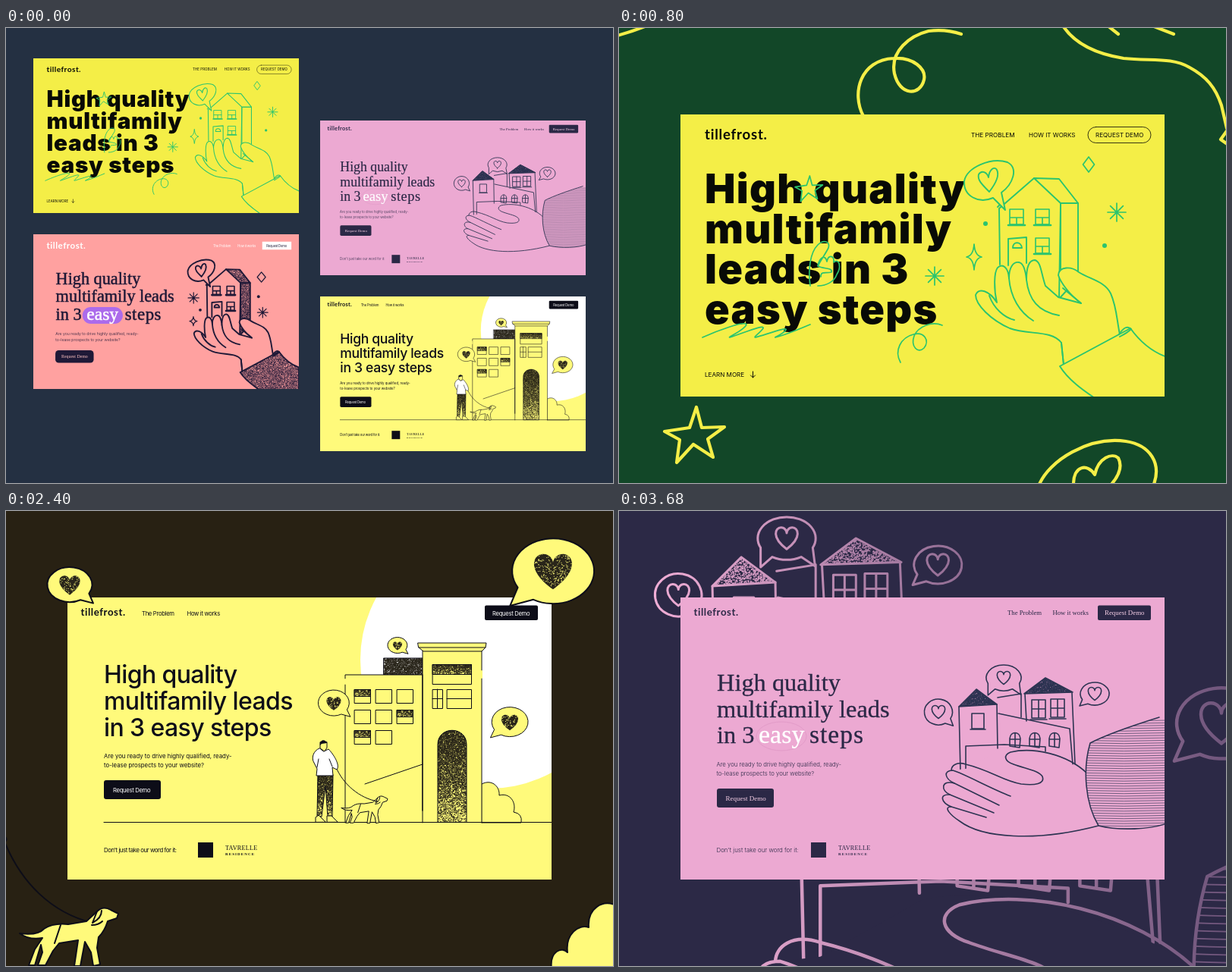
An HTML page with a canvas that plays this animation: 800x600 px, repeating every 4000 ms.

```html
<!DOCTYPE html>
<html lang="en">
<head>
<meta charset="utf-8">
<title>Landing page concepts</title>
<style>
html, body { margin: 0; width: 800px; height: 600px; overflow: hidden; background: #243042; }
canvas { display: block; }
</style>
</head>
<body>
<canvas id="stage" width="800" height="600"></canvas>
<script>
const ctx = document.getElementById('stage').getContext('2d');
const SANS = 'Inter, sans-serif', SERIF = '"Liberation Serif", serif', LOGO = 'Lato, sans-serif';
const BRAND = 'tillefrost.';
const PITCH = ['Are you ready to drive highly qualified, ready-', 'to-lease prospects to your website?'];

// ---- helpers ----
const path = d => d instanceof Path2D ? d : new Path2D(d);

function place(d, x, y, sx, sy = sx) {
  const p = new Path2D();
  p.addPath(path(d), new DOMMatrix([sx, 0, 0, sy, x, y]));
  return p;
}
function fill(d, color) { ctx.fillStyle = color; ctx.fill(path(d)); }
function line(d, color, width = 1) {
  ctx.strokeStyle = color;
  ctx.lineWidth = width;
  ctx.stroke(path(d));
}
function shape(d, color, ink, width) { fill(d, color); line(d, ink, width); }
function box(x, y, w, h, color, r = 0) {
  ctx.fillStyle = color;
  ctx.beginPath();
  ctx.roundRect(x, y, w, h, r);
  ctx.fill();
}
function dot(x, y, r, color) { box(x - r, y - r, 2 * r, 2 * r, color, r); }
function frame(x, y, w, h) { return `M${x} ${y}h${w}v${h}h${-w}Z`; }

function text(s, x, y, size, color, { font = SANS, weight = 400, gap = 0, thick = 0 } = {}) {
  ctx.font = `${weight} ${size}px ${font}`;
  ctx.letterSpacing = gap + 'px';
  ctx.fillStyle = color;
  ctx.fillText(s, x, y);
  if (thick) {
    ctx.strokeStyle = color;
    ctx.lineWidth = thick;
    ctx.strokeText(s, x, y);
  }
}
function lines(list, x, y, step, ...style) {
  list.forEach((s, i) => text(s, x, y + i * step, ...style));
}
function logo(x, y, size, color) {
  text(BRAND, x, y, size, color, { font: LOGO, weight: 700, gap: size * 0.042 });
}

// Seeded grain inside a shape; fade thins it towards the bottom.
function stipple(d, [x, y, w, h], color, density, fade = 0) {
  let seed = 7;
  const rnd = () => (seed = (seed * 16807) % 2147483647) / 2147483647;
  ctx.save();
  ctx.clip(path(d));
  ctx.fillStyle = color;
  for (let n = w * h * density; n > 0; n--) {
    const px = rnd() * w, py = rnd() * h;
    if (rnd() >= fade * py / h) ctx.fillRect(x + px, y + py, 1, 1);
  }
  ctx.restore();
}

// ---- small motifs (unit size) ----
const HEART = 'M0 .9C-1.4 -.1 -1 -.9 -.5 -.9C-.15 -.9 0 -.6 0 -.45C0 -.6 .15 -.9 .5 -.9C1 -.9 1.4 -.1 0 .9Z';
const SPEECH = 'M.86 .51A1 1 0 1 0 .48 .88L1.05 1.07Z';
const TWIN = 'M.9 .44A1 1 0 1 0 -.9 .44L-.9 1.35L-.5 .87A1 1 0 0 0 .5 .87L.98 1.3Z';
const SPARK = 'M0 -1Q.1 -.1 1 0Q.1 .1 0 1Q-.1 .1 -1 0Q-.1 -.1 0 -1Z';
const DIAMOND = 'M0 -1L1 0L0 1L-1 0Z';
const BURST = 'M-1 0H1M0 -1V1M-.7 -.7L.7 .7M-.7 .7L.7 -.7';
const STAR = 'M102 500L109 527L139 526L117 542L124 566L98 549L76 573L80 543L60 532L93 527Z';

// ---- doodles behind the first two pages ----
function doodles(color) {
  [
    'M-2 10Q16 5 34 -2',
    'M322 116C306 86 318 42 362 40C388 38 405 54 402 68C397 90 370 90 363 60C357 30 384 10 408 4Q430 1 451 8',
    'M585 -3C600 20 628 34 665 40C700 44 728 38 752 52C774 64 786 78 794 102L801 132',
    'M803 133L793 147L803 154', 'M644 -3L658 8', 'M700 -4L731 8', STAR,
    'M553 604C566 570 620 538 668 545C700 550 716 574 704 604',
    'M599 604C598 576 618 574 627 589C632 566 650 560 658 567C665 580 656 594 647 604'
  ].forEach(d => line(d, color, 4.2));
}

// ---- hand holding a house ----
const HAND = 'M586 444L583 415C570 398 540 405 515 396C490 385 470 365 470 352C474 342 488 346 498 362' +
  'C494 345 494 322 499 316C506 310 513 316 514 330C514 315 520 308 527 309C534 310 536 322 537 332' +
  'C537 315 540 306 548 306C556 308 556 322 562 340L579 355L609 363C592 350 582 335 579 326' +
  'C580 314 596 314 606 322C622 332 640 334 648 350C656 368 656 385 660 404';
const KNUCKLES = 'M488 353C494 370 508 382 521 385M514 330C516 355 528 375 546 386M537 332C540 358 552 374 580 379';
const SIDE = 'M582 231H605V330L580 357Z';
const ROOF = 'M547 198L580 199L605 231H582Z';
const CUFF = 'M581 446L674 396C684 410 700 426 722 434V490H630C612 478 592 464 581 446Z';

function handAndHouse(paper, ink, width, grain) {
  fill('M502 238L547 198L582 231V360H502Z', paper);
  if (grain) {
    stipple(ROOF, [545, 197, 62, 36], ink, 0.8);
    stipple(SIDE, [579, 230, 28, 128], ink, 1);
  }
  [ROOF, SIDE, 'M502 312L501 238L547 198M582 231V330', 'M513 313V278L537 276V310',
    'M519 290C519 281 530 281 531 290Z', 'M499 236L503 232'].forEach(d => line(d, ink, width));
  [[515, 239], [549, 239], [549, 277]].forEach(([x, y]) => {
    line(frame(x, y, 18, 20) + `M${x} ${y + 11}h18m-9 0v9`, ink, width * 0.85);
    line(`M${x - 2} ${y + 21}h22`, ink, width * 1.4);
  });
  fill(HAND, paper);
  line(HAND, ink, width);
  line(KNUCKLES, ink, width);
  line('M583 415L586 444M609 363L585 343', ink, width);
  fill(CUFF, paper);
  if (grain) {
    stipple(CUFF, [578, 394, 144, 94], ink, 0.85);
    fill('M654 405L674 395L668 403Z', ink);
  }
  line(CUFF, ink, width);
  line('M659 404Q668 390 675 397Q670 402 660 407', ink, width);
  shape('M493 224C474 232 454 222 455 202C458 184 490 170 512 177C527 185 519 206 504 217L509 240L493 224', paper, ink, width);
  line('M488 216C478 206 472 200 474 193C478 187 485 190 487 197C488 186 495 182 498 187C502 195 495 207 488 216', ink, width);
}

// ---- hands holding a row of houses ----
const PALM = 'M457 340L500 316C520 310 580 318 617 346L632 415C600 432 520 436 478 424C458 416 444 404 438 398' +
  'C424 390 428 380 441 383C420 374 424 360 436 362C426 354 424 341 440 342Z';
const SLEEVE = 'M715 272C680 282 642 295 621 306C611 340 614 385 632 415C660 422 700 420 722 412V272Z';

function outlineBubble(d, x, y, rx, ry, paper, ink, width) {
  shape(place(d, x, y, rx, ry), paper, ink, width);
  line(place(HEART, x, y, 9, 9.5), ink, width);
}
function housesInHands(paper, ink, width, roofGrain = 3) {
  const draw = d => line(d, ink, width);
  outlineBubble(TWIN, 507, 220, 23, 17, paper, ink, width);
  outlineBubble(SPEECH, 421, 265, 18.5, 17, paper, ink, width);
  outlineBubble(SPEECH, 627, 241, -19, 15, paper, ink, width);
  const roofs = ['M448 258L471 235L498 255Z', 'M534 241L562 220L598 239Z'];
  roofs.forEach((d, i) => {
    stipple(d, [i ? 534 : 448, i ? 220 : 235, 64, 24], ink, roofGrain);
    draw(d);
  });
  draw('M448 258L450 345M498 255L499 313M499 246L530 241V272M535 241L537 277M597 240L601 334');
  draw(frame(465, 267, 16, 20) + 'M463 288h20');
  draw(frame(544, 249, 18, 24) + frame(569, 248, 18, 24) + 'M553 249v23M544 261h18M578 248v23M569 260h18M542 275h22M567 274h22');
  draw('M500 267L594 287L598 334M457 340V310L508 308L562 311V317');
  [522, 548, 574].forEach(x =>
    draw(`M${x - 7} 310V300C${x - 6} 290 ${x + 6} 290 ${x + 7} 300L${x + 6} 312ZM${x} 293V311M${x - 7} 301H${x + 7}`));
  fill(PALM, paper);
  [
    'M617 346C590 320 545 311 516 318C506 322 508 330 520 334C536 340 553 342 558 350C562 360 548 362 530 360C506 356 490 342 457 334C445 330 438 336 438 342',
    'M516 376C490 366 454 346 440 342C427 342 429 353 442 359L501 388',
    'M442 359C424 354 424 369 436 374L494 398',
    'M436 374C421 373 425 385 438 390L484 404',
    'M438 390C426 390 438 402 449 409C478 431 548 437 632 415'
  ].forEach(draw);
  fill(SLEEVE, paper);
  ctx.save();
  ctx.clip(path(SLEEVE));
  for (let y = 276; y < 420; y += 3.3) line(`M610 ${y}Q665 ${y + 2} 722 ${y}`, ink, width * 0.4);
  ctx.restore();
  line('M712 272C680 282 642 295 621 306C611 340 614 385 632 415C660 422 700 420 722 412', ink, width);
}

// ---- city street ----
const LEMON = '#fffa7b', COAL = '#29251a', BLACK = '#0d0d18';
const DOG = 'M18 557Q42 560 50 551Q62 543 82 545L106 541L120 528Q128 520 138 526L148 531L146 537L134 541Q130 554 122 562' +
  'L120 576L124 598L115 600L112 582L104 568L98 600H90L95 566L70 570L62 580L52 599H42L48 582L46 572L38 599H30L38 578L48 563Q30 566 18 557Z';

function heartBubble(x, y, rx, ry, width = 1, side = 1) {
  shape(place(SPEECH, x, y, rx * side, ry), LEMON, BLACK, width);
  const r = rx * 0.48, heart = place(HEART, x, y + 1, r);
  fill(heart, COAL);
  stipple(heart, [x - r, y - r, 2 * r, 2 * r], LEMON, 0.15);
}
function dog(x, y, scale, width) {
  const at = d => place(d, x, y, scale);
  shape(at(DOG), LEMON, BLACK, width);
  line(at('M126 527Q126 537 114 543L120 528M72 546L64 570M113 546Q122 546 127 541'), BLACK, width);
}
function grainBox(x, y, w, h, fade) {
  stipple(frame(x, y, w, h), [x, y, w, h], COAL, 2.4, fade);
  line(frame(x, y, w, h), BLACK);
}
function walker() {
  line('M435 338C444 360 466 379 490 383', BLACK);
  const legs = 'M411 348L410 403H416L421 362L424 403H430L431 348Z';
  stipple(legs, [408, 347, 25, 58], COAL, 2.6, 0.85);
  line(legs, BLACK);
  shape('M408 410V404L412 401L421 410ZM423 410V402H429L437 410Z', LEMON, BLACK);
  shape('M414 305V313L420 317L423 312V305Z', LEMON, BLACK);
  fill('M414 309C413 301 421 300 423 306L416 307Z', BLACK);
  shape('M413 313C405 316 402 326 406 332L410 340L409 349H431L430 338L436 341C441 335 431 320 425 314L419 317Z', '#fff', BLACK);
  line('M410 338L412 327M430 337L426 327', BLACK);
}
function street() {
  shape('M627 360C640 353 651 363 650 375C664 371 673 384 669 397Q681 399 679 411H627Z', LEMON, BLACK);
  grainBox(498, 194, 51, 22, 0.1);
  shape('M447 411V216H549V411', LEMON, BLACK);
  shape('M549 395V184H627V411M549 216V395', LEMON, BLACK);
  shape('M543 174H633L632 180H544ZM544 180L550 185H627L632 180', LEMON, BLACK);
  line('M627 211v9M447 222v6', LEMON, 2);
  for (let i = 0; i < 8; i++) {
    const x = 459.5 + i % 3 * 28, y = 235.5 + Math.floor(i / 3) * 27;
    line(frame(x, y, 21, 18), BLACK);
    if (i === 0 || i === 5 || i === 6) grainBox(x, y, 21, 9, 0.9);
  }
  line(frame(562.5, 202.5, 51, 26), BLACK);
  grainBox(562.5, 202.5, 51, 13, 0.8);
  line(frame(562.5, 235.5, 13, 25) + frame(581.5, 235.5, 32, 25) + 'M562 247.5h13M568.5 235v25M581 247.5h32', BLACK);
  const door = 'M569 410V308C569 283 607 283 607 308V410Z';
  stipple(door, [568, 288, 40, 123], COAL, 2.4, 0.85);
  line(door, BLACK);
  line('M473 360L549 334', BLACK);
  line('M129 410.5H719', BLACK);
  heartBubble(432, 253, 20.5, 17);
  heartBubble(516, 177, 13, 10.5);
  heartBubble(664, 278, 24, 19.5, 1, -1);
  dog(503 - 148 * 0.468, 379 - 530 * 0.468, 0.468, 1);
  walker();
}

// ---- pages, laid out in the 638 x 372 window at (81, 114) ----
function partners(color) {
  box(253, 437, 20, 20, color);
  text('TAVRELLE', 289, 447, 8.2, color, { font: SERIF, gap: 0.25 });
  text('RESIDENCE', 289, 454, 5, color, { font: SERIF, weight: 700, gap: 1.1 });
}

function boldPage() {
  const paper = '#f4ee47', green = '#2bc46e', ink = '#080a06';
  box(81, 114, 638, 372, paper);
  logo(113, 147, 18.6, ink);
  text('THE PROBLEM', 464, 144, 8.2, ink);
  text('HOW IT WORKS', 540, 144, 8, ink);
  text('REQUEST DEMO', 628, 144, 8, ink);
  ctx.beginPath();
  ctx.roundRect(618, 130.5, 83, 21, 10.5);
  ctx.strokeStyle = ink;
  ctx.lineWidth = 0.8;
  ctx.stroke();
  lines(['High quality', 'multifamily', 'leads in 3', 'easy steps'], 113, 231, 53, 54, ink, { weight: 900, gap: 1.3 });
  text('LEARN MORE', 113, 459.5, 8.1, ink);
  line('M176.5 453V461M173.5 458L176.5 461L179.5 458', ink);
  handAndHouse(paper, green, 1.9, false);
  [
    place(STAR, 250 - 99 * 0.46, 212 - 537 * 0.46, 0.46),
    place(BURST, 656, 243, 12), place(BURST, 416, 327, 12),
    place(SPARK, 468, 302, 10, 17), place(DIAMOND, 619, 180, 7.5, 10),
    'M110 408C130 399 165 386 168 391C165 399 142 408 146 408C165 402 192 390 190 396C186 402 176 408 180 408C200 402 222 394 220 398C216 404 204 408 206 408C222 404 240 396 252 391',
    'M371 441C362 425 372 408 388 404C402 400 410 412 402 422C394 430 384 420 389 406C394 394 412 386 426 392',
    'M252 340C249 318 252 296 262 286C270 278 279 282 276 290C272 298 266 306 262 314M262 314C264 302 272 298 274 308C276 298 284 300 283 309C291 303 293 316 287 325C284 334 274 340 262 340M262 314C270 318 282 316 280 322C272 324 266 320 266 328'
  ].forEach(d => line(d, green, 1.7));
  dot(483, 258, 3, green);
  dot(640, 287, 3, green);
}

function coralPage(light) {
  const paper = '#ffa1a0', ink = '#1f1937', top = light ? '#fff' : ink;
  const head = { font: SERIF, thick: 0.9 };
  const nav = { gap: -0.35 };
  box(81, 114, 638, 372, paper);
  logo(113, 149, 21.2, top);
  text('The Problem', 513, 145, 7.7, top, nav);
  text('How it works', 572, 145, 7.7, top, nav);
  box(631, 132, 70, 19, '#fff');
  text('Request Demo', 641, 145, 7.7, ink, nav);
  lines(['High quality', 'multifamily leads', 'in 3'], 135, 234, 43, 40.5, ink, head);
  box(199, 289, 97, 40, '#ac6beb', 20);
  text('easy', 209, 320, 43, '#fff', head);
  text('steps', 301, 320, 41.5, ink, { ...head, gap: 1 });
  lines(PITCH, 134.5, 356.5, 15, 9.4, ink, { weight: 300 });
  box(134, 393, 92, 30, ink, 8);
  text('Request Demo', 148.5, 411.5, 10.7, '#ffc3c2', { font: SERIF });
  ctx.save();
  ctx.translate(-3, 0);
  handAndHouse(paper, ink, 3.4, true);
  ctx.restore();
  line(place(BURST, 466, 267, 13), ink, 2.2);
  line(place(BURST, 632, 302, 12.5), ink, 2.2);
  line(place(SPARK, 465.5, 323, 9, 11), ink, 2.2);
  line(place(DIAMOND, 629, 217, 10, 12), ink, 2.2);
  dot(482, 296, 3.5, ink);
  dot(622, 264, 3.5, ink);
}

function lemonPage() {
  const nav = { gap: -0.32 };
  box(81, 114, 638, 372, LEMON);
  dot(637, 196, 170, '#fff');
  logo(98.5, 138, 13.3, BLACK);
  text('The Problem', 179, 137.5, 7.7, BLACK, nav);
  text('How it works', 238.5, 137.5, 7.7, BLACK, nav);
  box(631, 124.5, 70, 19.5, BLACK, 2);
  text('Request Demo', 641, 137.5, 7.7, '#fff', nav);
  lines(['High quality', 'multifamily leads', 'in 3 easy steps'], 129, 227, 35, 32, BLACK, { weight: 500, gap: -0.6 });
  lines(PITCH, 129, 326, 12, 7.8, BLACK);
  box(129, 355, 75, 25, BLACK, 3);
  text('Request Demo', 141, 371, 7.7, '#fff', nav);
  text("Don't just take our word for it:", 129, 450, 7.8, BLACK, { gap: -0.43 });
  partners(BLACK);
  street();
}

function pinkPage() {
  const paper = '#eca9d2', ink = '#2b2846', serif = { font: SERIF };
  const head = { font: SERIF, thick: 0.3 };
  box(81, 114, 638, 372, paper);
  logo(98.5, 138, 13.3, ink);
  text('The Problem', 512, 137, 8.7, ink, serif);
  text('How it works', 571.5, 137, 8.7, ink, serif);
  box(631, 124.5, 70, 19.5, ink, 2);
  text('Request Demo', 640, 137, 8.9, '#f6cfe6', serif);
  lines(['High quality', 'multifamily leads', 'in 3'], 129, 237, 34.7, 32.4, ink, head);
  line(place('M-1 0A1 1 0 1 1 1 0A1 1 0 1 1 -1 0Z', 214, 297, 33, 19), '#e29bc8', 1);
  text('easy', 184, 306.4, 34, '#fff', head);
  text('steps', 251, 306.4, 33.5, ink, { ...head, gap: 1 });
  lines(PITCH, 128.5, 337, 12, 7.75, ink, { weight: 300 });
  box(129, 366, 75, 25, ink, 3);
  text('Request Demo', 140.5, 381.5, 9, '#f6cfe6', serif);
  text("Don't just take our word for it:", 128.5, 450, 7.9, ink, { weight: 300 });
  partners(ink);
  housesInHands(paper, '#2d3452', 1.6);
}

// ---- scenes ----
function card(page, x = 81, y = 114, scale = 1, light = false) {
  ctx.save();
  ctx.translate(x, y);
  ctx.scale(scale, scale);
  ctx.translate(-81, -114);
  ctx.beginPath();
  ctx.rect(81, 114, 638, 372);
  ctx.clip();
  page(light);
  ctx.restore();
}
function backdrop(color) { box(0, 0, 800, 600, color); }

function overview() {
  const scale = 350 / 638;
  backdrop('#243042');
  card(boldPage, 36, 40, scale);
  card(coralPage, 36, 272, scale, true);
  card(pinkPage, 414, 122, scale);
  card(lemonPage, 414, 354, scale);
}
function boldScene() {
  backdrop('#124728');
  doodles('#f4ee47');
  card(boldPage);
}
function coralScene() {
  backdrop('#1f1937');
  card(coralPage);
  doodles('#ac6beb');
}
function lemonScene() {
  backdrop('#282113');
  card(lemonPage);
  heartBubble(84, 97, 29.5, 23, 2);
  heartBubble(721, 79, 54, 43, 2, -1);
  line('M-3 430A3 3 0 1 1 -2 436C20 490 60 530 114 543', BLACK, 2);
  dog(0, 0, 1, 2);
  shape('M719 604C716 580 733 574 740 582C737 558 755 544 768 549C766 524 786 512 804 520V604Z', LEMON, BLACK, 2);
}
function enlarged(fromX, fromY, toX, toY, scale, width, fadeEnd) {
  const ink = ctx.createLinearGradient(400, 0, fadeEnd, 0);
  ink.addColorStop(0, '#f0aed6');
  ink.addColorStop(1, '#5f4a70');
  ctx.save();
  ctx.translate(toX, toY);
  ctx.scale(scale, scale);
  ctx.translate(-fromX, -fromY);
  housesInHands('#2c2946', ink, width / scale, 0.8);
  ctx.restore();
}
function pinkScene() {
  backdrop('#2c2946');
  enlarged(509, 325, 427, 541, 3.11, 4.5, 660);
  box(0, 0, 720, 300, '#2c2946');
  enlarged(507, 220, 221, 36, 1.66, 3, 780);
  card(pinkPage);
}

const scenes = [overview, boldScene, coralScene, lemonScene, pinkScene];
const HOLD = 800;
let shown = -1;
ctx.lineCap = ctx.lineJoin = 'round';

function tick() {
  const index = Math.floor(performance.now() / HOLD) % scenes.length;
  if (index !== shown) scenes[shown = index]();
  requestAnimationFrame(tick);
}
tick();
</script>
</body>
</html>
```
